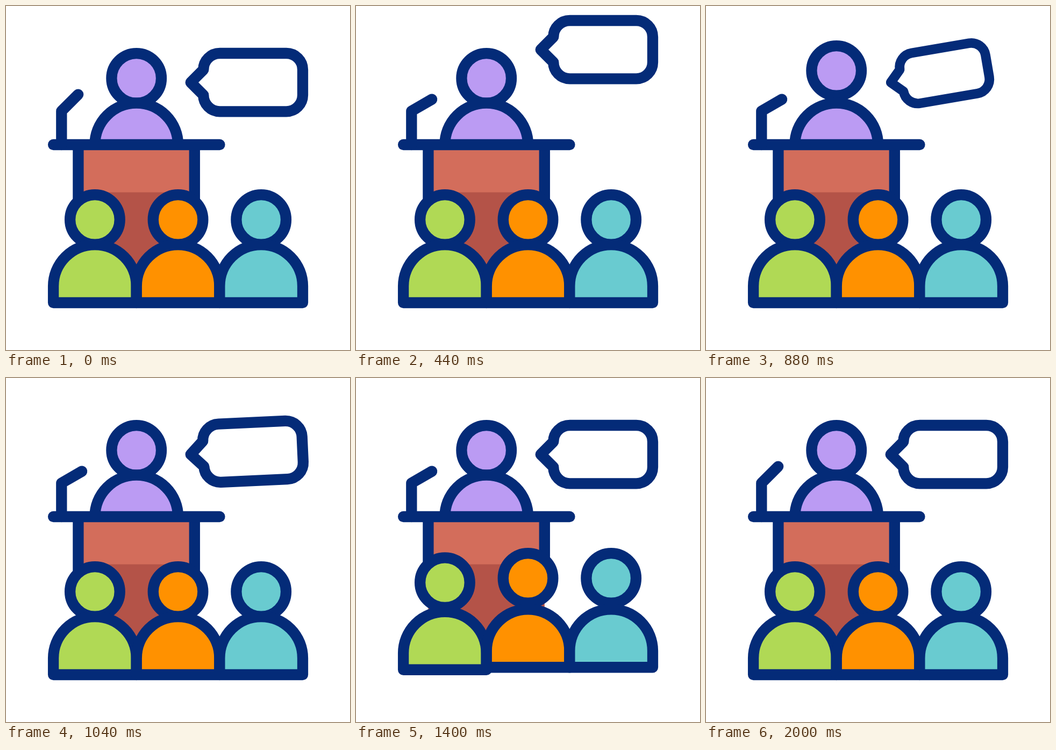
An HTML page with a canvas for the animation above (2120 ms loop, 640 by 640 pixels).

```html
<!DOCTYPE html>
<html lang="en">
<head>
<meta charset="utf-8">
<title>Speaker and audience</title>
<style>
html, body { margin: 0; width: 100%; height: 100%; overflow: hidden; background: #fff; }
canvas { display: block; width: 100vmin; height: 100vmin; }
</style>
</head>
<body>
<canvas id="stage" width="640" height="640"></canvas>
<script>
const ctx = document.getElementById('stage').getContext('2d');
const LOOP = 2120, STEP = 40, LAST = 2000;
const NAVY = '#042b78', LILAC = '#bb9bf3';
const BRICK = '#d36d5b', DARK_BRICK = '#b45348';
const PITCH = 154.65;
const CROWD = ['#b0d955', '#ff9100', '#69cbd0'];
const TIP = [343.7, 142.2];

const clamp = v => Math.max(0, Math.min(1, v));
const smooth = v => { v = clamp(v); return v * v * (3 - 2 * v); };
// Height of a ballistic hop, x ms away from its peak
const hop = (x, height, half) => height * Math.max(0, 1 - (x / half) ** 2);

function shape(d, fill) {
  const path = new Path2D(d);
  if (fill) {
    ctx.fillStyle = fill;
    ctx.fill(path);
  }
  ctx.stroke(path);
}

function head(x, y, fill) {
  ctx.beginPath();
  ctx.arc(x, y, 46.3, 0, Math.PI * 2);
  ctx.fillStyle = fill;
  ctx.fill();
  ctx.stroke();
}

function speaker(t) {
  head(242.7, 134.4 - hop(t - 748, 24.5, 202), LILAC);
  shape('M165.4 258A77.3 77.3 0 0 1 320 258', LILAC);
}

function podium() {
  ctx.fillStyle = BRICK;
  ctx.fillRect(134.4, 258, 216.4, 89);
  ctx.fillStyle = DARK_BRICK;
  ctx.fillRect(134.4, 346.6, 216.4, 150);
  ctx.lineCap = 'butt';
  shape('M134.4 258V366M350.8 258V366');
  ctx.lineCap = 'round';
  shape('M88.1 258H397.5');
}

function mic(t) {
  const bend = smooth((t - 180) / 240) - smooth((t - 1720) / 280);
  const angle = (45 - 15 * bend) * Math.PI / 180;
  const x = 103.3 + 43.7 * Math.cos(angle);
  const y = 195.5 - 43.7 * Math.sin(angle);
  shape(`M103.3 258V195.5L${x} ${y}`);
}

function bubble(t) {
  ctx.save();
  if (t < 660) {
    const rise = Math.max(0, t - 180) / 260;
    ctx.translate(0, -61 * rise * rise);
  } else {
    // Grows out of its tail while swinging level
    const size = 1 - (1 - clamp((t - 660) / 340)) ** 2;
    const tilt = t < 1320 ? 9.7 * Math.exp((880 - t) / 122) : 0;
    ctx.translate(...TIP);
    ctx.rotate(-tilt * Math.PI / 180);
    ctx.scale(size, size);
    ctx.translate(-TIP[0], -TIP[1]);
  }
  shape('M397.8 88H521.5A30.5 30.5 0 0 1 552 118.5V165.8A30.5 30.5 0 0 1 521.5 196.3' +
    'H397.8A30.5 30.5 0 0 1 367.3 165.8L343.7 142.2L367.3 118.5A30.5 30.5 0 0 1 397.8 88Z', '#fff');
  ctx.restore();
}

function listener(t, i) {
  const since = t - 1280 - 80 * i;
  const bounce = hop(since - 360, 6.8, 160);
  const headUp = hop(since, 26, 202) + bounce;
  const bodyUp = hop(since, 14.3, 202) + bounce;
  ctx.save();
  ctx.translate(PITCH * i, 0);
  head(165.4, 397.4 - headUp, CROWD[i]);
  ctx.translate(0, -bodyUp);
  shape('M88.1 552V521.3A77.3 77.3 0 0 1 242.7 521.3V552Z', CROWD[i]);
  ctx.restore();
}

function draw(t) {
  ctx.fillStyle = '#fff';
  ctx.fillRect(0, 0, 640, 640);
  ctx.strokeStyle = NAVY;
  ctx.lineWidth = 20.3;
  ctx.lineJoin = ctx.lineCap = 'round';
  bubble(t);
  speaker(t);
  podium();
  mic(t);
  CROWD.forEach((_, i) => listener(t, i));
}

const start = performance.now();
function tick() {
  const t = (performance.now() - start) % LOOP;
  draw(Math.min(LAST, Math.floor(t / STEP) * STEP));
  requestAnimationFrame(tick);
}
tick();
</script>
</body>
</html>
```
